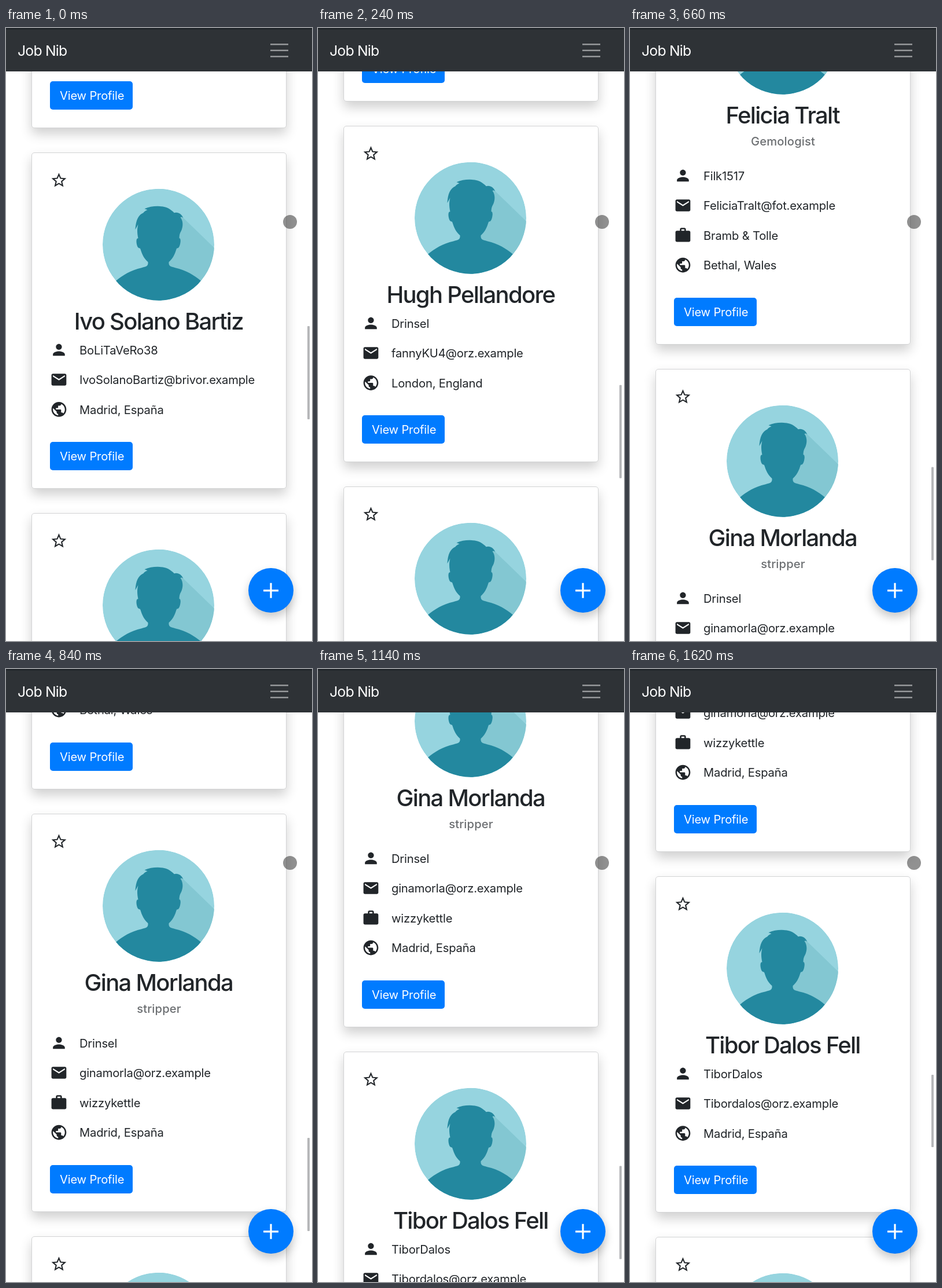
An HTML page for the animation above (1.68 s loop, 529 by 1059 pixels).

```html
<!DOCTYPE html>
<html lang="en">
<head>
<meta charset="utf-8">
<title>Profile list</title>
<style>
  html, body { margin: 0; width: 100%; height: 100%; overflow: hidden; background: #fff; }
  #stage { position: absolute; left: 0; top: 0; width: 529px; height: 1059px; overflow: hidden; background: #fff; }
  #stage > *, .card { position: absolute; }
  svg { position: absolute; left: 0; top: 0; overflow: visible; }
  text { font-family: Inter, "Open Sans", sans-serif; font-size: 20.2px; letter-spacing: -.2px; fill: #212529; }
  #list { left: 0; top: 0; will-change: transform; }
  .card {
    left: 44px; width: 441px; box-sizing: border-box; background: #fff;
    border: 1px solid #d3d4d5; border-radius: 5px;
    box-shadow: 0 10px 20px rgba(0, 0, 0, .19);
  }
  .card svg { left: -1px; top: -1px; }
  .name { font-size: 40px; font-weight: 500; letter-spacing: -1.7px; text-anchor: middle; }
  .job { font-weight: 500; letter-spacing: .15px; text-anchor: middle; fill: #6c6f72; }
  .label { fill: #fff; }
  .icon { fill: #212529; }
  #nav { left: 0; top: 0; width: 529px; height: 75px; background: #2e3236; box-shadow: inset 0 2.5px #1f2429; }
  #brand { font-size: 24.8px; letter-spacing: -.8px; fill: #fff; }
  #bar { left: 521px; top: 0; width: 4px; border-radius: 1px; background: #b6b7b9; }
  #touch { left: 479px; top: 323px; width: 24px; height: 24px; border-radius: 50%; background: rgba(40, 40, 40, .51); }
  #add {
    left: 419.4px; top: 932.9px; width: 77.2px; height: 77.2px; border-radius: 50%;
    background: #007bff; box-shadow: 0 8px 16px rgba(0, 0, 0, .22);
  }
  #loader { left: 168.5px; top: 436px; width: 193px; height: 193px; border-radius: 6px; background: #6b6f72; }
</style>
</head>
<body>
<div id="stage">
  <div id="list"></div>
  <div id="nav">
    <svg width="529" height="75">
      <text id="brand" x="20" y="47.5">Job Nib</text>
      <path d="M457 28.2h31M457 38.7h31M457 49.2h31" stroke="#96989a" stroke-width="2.5"/>
    </svg>
  </div>
  <div id="bar"></div>
  <div id="add">
    <svg width="77" height="77"><path d="M26 38.8h26M39 25.8v26" stroke="#fff" stroke-width="3.2"/></svg>
  </div>
  <div id="loader">
    <svg width="193" height="193">
      <path id="arc" fill="none" stroke="#fff" stroke-width="7"/>
    </svg>
  </div>
  <div id="touch"></div>
</div>

<svg width="0" height="0">
  <defs>
    <path id="star" d="M22 9.24l-7.19-.62L12 2 9.19 8.63 2 9.24l5.46 4.73L5.82 21 12 17.27 18.18 21l-1.63-7.03L22 9.24zM12 15.4l-3.76 2.27 1-4.28-3.32-2.88 4.38-.38L12 6.1l1.71 4.04 4.38.38-3.32 2.88 1 4.28L12 15.4z"/>
    <path id="user" d="M12 12c2.21 0 4-1.79 4-4s-1.79-4-4-4-4 1.79-4 4 1.79 4 4 4zm0 2c-2.67 0-8 1.34-8 4v2h16v-2c0-2.66-5.33-4-8-4z"/>
    <path id="mail" d="M20 4H4c-1.1 0-2 .9-2 2v12c0 1.1.9 2 2 2h16c1.1 0 2-.9 2-2V6c0-1.1-.9-2-2-2zm0 4l-8 5-8-5V6l8 5 8-5v2z"/>
    <path id="work" d="M20 6h-4V4c0-1.11-.89-2-2-2h-4c-1.11 0-2 .89-2 2v2H4c-1.11 0-2 .89-2 2v11c0 1.11.89 2 2 2h16c1.11 0 2-.89 2-2V8c0-1.11-.89-2-2-2zm-6 0h-4V4h4v2z"/>
    <path id="globe" d="M12 2C6.48 2 2 6.48 2 12s4.48 10 10 10 10-4.48 10-10S17.52 2 12 2zm-1 17.93c-3.95-.49-7-3.85-7-7.93 0-.62.08-1.21.21-1.79L9 15v1c0 1.1.9 2 2 2v1.93zm6.9-2.54c-.26-.81-1-1.39-1.9-1.39h-1v-3c0-.55-.45-1-1-1H8v-2h2c.55 0 1-.45 1-1V7h2c1.1 0 2-.9 2-2v-.41c2.93 1.19 5 4.06 5 7.41 0 2.08-.8 3.97-2.1 5.39z"/>
    <clipPath id="round"><circle r="96.5"/></clipPath>
    <g id="avatar" clip-path="url(#round)">
      <circle r="96.5" fill="#96d4df"/>
      <path d="M36-53L98 7V98H0V0z" fill="#83c7d2"/>
      <path fill="#23889f" d="M-35-11C-37-20-37-28-35-35L-40-26C-39-42-35-51-26-55C-25-57-23-58-19-60L-24-62C-10-68 10-68 20-61C24-58 26-57 27-55C34-57 40-53 43-46C41-48 39-48 38-47C43-41 43-31 39-23C37-20 36-16 36-11C40-12 38 2 35 5C33 7 32 5 31 8C28 18 24 25 18 30V33C19 38 23 38 29 40C48 44 62 53 74 63V98H-74V63C-62 53-48 44-29 40C-23 38-19 38-18 33V30C-24 25-28 18-31 8C-32 5-33 7-35 5C-38 2-40-12-35-11z"/>
    </g>
  </defs>
</svg>

<script>
const $ = id => document.getElementById(id);
const GAP = 42, LOOP = 1680, TICK = 60;
const LOAD_START = 1320, LOAD_END = 1500;

const people = [
  { name: "Hugh Pellandore", user: "Drinsel", mail: "fannyKU4@orz.example", place: "London, England" },
  { name: "Ivo Solano Bartiz", user: "BoLiTaVeRo38", mail: "IvoSolanoBartiz@brivor.example", place: "Madrid, España" },
  { name: "Hugh Pellandore", user: "Drinsel", mail: "fannyKU4@orz.example", place: "London, England" },
  { name: "Felicia Tralt", job: "Gemologist", user: "Filk1517", mail: "FeliciaTralt@fot.example", work: "Bramb &amp; Tolle", place: "Bethal, Wales" },
  { name: "Gina Morlanda", job: "stripper", user: "Drinsel", mail: "ginamorla@orz.example", work: "wizzykettle", place: "Madrid, España" },
  { name: "Tibor Dalos Fell", user: "TiborDalos", mail: "Tibordalos@orz.example", place: "Madrid, España" },
  { name: "Ivo Solano Bartiz", user: "BoLiTaVeRo38", mail: "IvoSolanoBartiz@brivor.example", place: "Madrid, España" }
];

const icon = (id, y) =>
  `<use href="#${id}" class="icon" transform="translate(32 ${y - 15.45}) scale(1.2875)"/>`;

function addCard(p, top) {
  const height = p.job ? 688 : 581;
  const rows = [["user", p.user], ["mail", p.mail], ["work", p.work], ["globe", p.place]].filter(r => r[1]);
  const first = p.job ? 396 : 341;
  const button = height - 81;
  const card = document.createElement("div");
  card.className = "card";
  card.style.cssText = `top:${top}px;height:${height}px`;
  card.innerHTML = `<svg width="441" height="${height}">
    ${icon("star", 48)}
    <use href="#avatar" x="219.5" y="159.2"/>
    <text class="name" x="219.8" y="306">${p.name}</text>
    ${p.job ? `<text class="job" x="220.5" y="344">${p.job}</text>` : ""}
    ${rows.map(([id, label], i) => {
      const y = first + i * 51.5;
      return icon(id, y) + `<text x="83" y="${y + 7.5}">${label}</text>`;
    }).join("")}
    <rect x="32" y="${button}" width="143" height="49" rx="5" fill="#007bff"/>
    <text class="label" x="49" y="${button + 32}">View Profile</text>
  </svg>`;
  $("list").append(card);
  return height + GAP;
}

let cardTop = -623;
for (const p of people) cardTop += addCard(p, cardTop);
const lastCard = $("list").lastChild;

// Scroll offset over time, joined by a monotone cubic
const keys = [[0, -215], [240, 454], [480, 983], [840, 1726], [1140, 2045], [1320, 2299], [1500, 2299], [1620, 2348]];
const slopes = keys.slice(1).map(([t, s], i) => (s - keys[i][1]) / (t - keys[i][0]));
const tangents = keys.map((_, i) => {
  const a = slopes[i - 1] ?? slopes[i], b = slopes[i] ?? 0;
  return a * b > 0 ? 2 * a * b / (a + b) : 0;
});

function scrollAt(t) {
  let i = 0;
  while (i < keys.length - 2 && t >= keys[i + 1][0]) i++;
  const [t0, s0] = keys[i], [t1, s1] = keys[i + 1];
  const d = t1 - t0, u = Math.min(1, (t - t0) / d), v = 1 - u;
  return Math.round(s0 * (1 + 2 * u) * v * v + s1 * u * u * (3 - 2 * u)
    + d * u * v * (tangents[i] * v - tangents[i + 1] * u));
}

const polar = deg => {
  const a = deg * Math.PI / 180;
  return `${96.5 + 29.3 * Math.cos(a)} ${96 + 29.3 * Math.sin(a)}`;
};
$("arc").setAttribute("d", `M${polar(223)}A29.3 29.3 0 1 1 ${polar(61)}`);

function draw(now) {
  const t = Math.floor(now % LOOP / TICK) * TICK;
  const scroll = scrollAt(t);
  const loaded = t >= LOAD_END;
  $("list").style.transform = `translateY(${-scroll}px)`;
  lastCard.style.visibility = loaded ? "visible" : "hidden";
  $("bar").style.height = (loaded ? 125 : 161) + "px";
  $("bar").style.transform = `translateY(${loaded ? 701 + (scroll - 2348) * .118 : 515 + (scroll + 215) * .152}px)`;
  $("loader").style.visibility = t >= LOAD_START && !loaded ? "visible" : "hidden";
  $("arc").setAttribute("transform", `rotate(${(t - LOAD_START) * .36} 96.5 96)`);
}

const start = performance.now();
function tick() {
  draw(performance.now() - start);
  requestAnimationFrame(tick);
}
tick();
</script>
</body>
</html>
```
